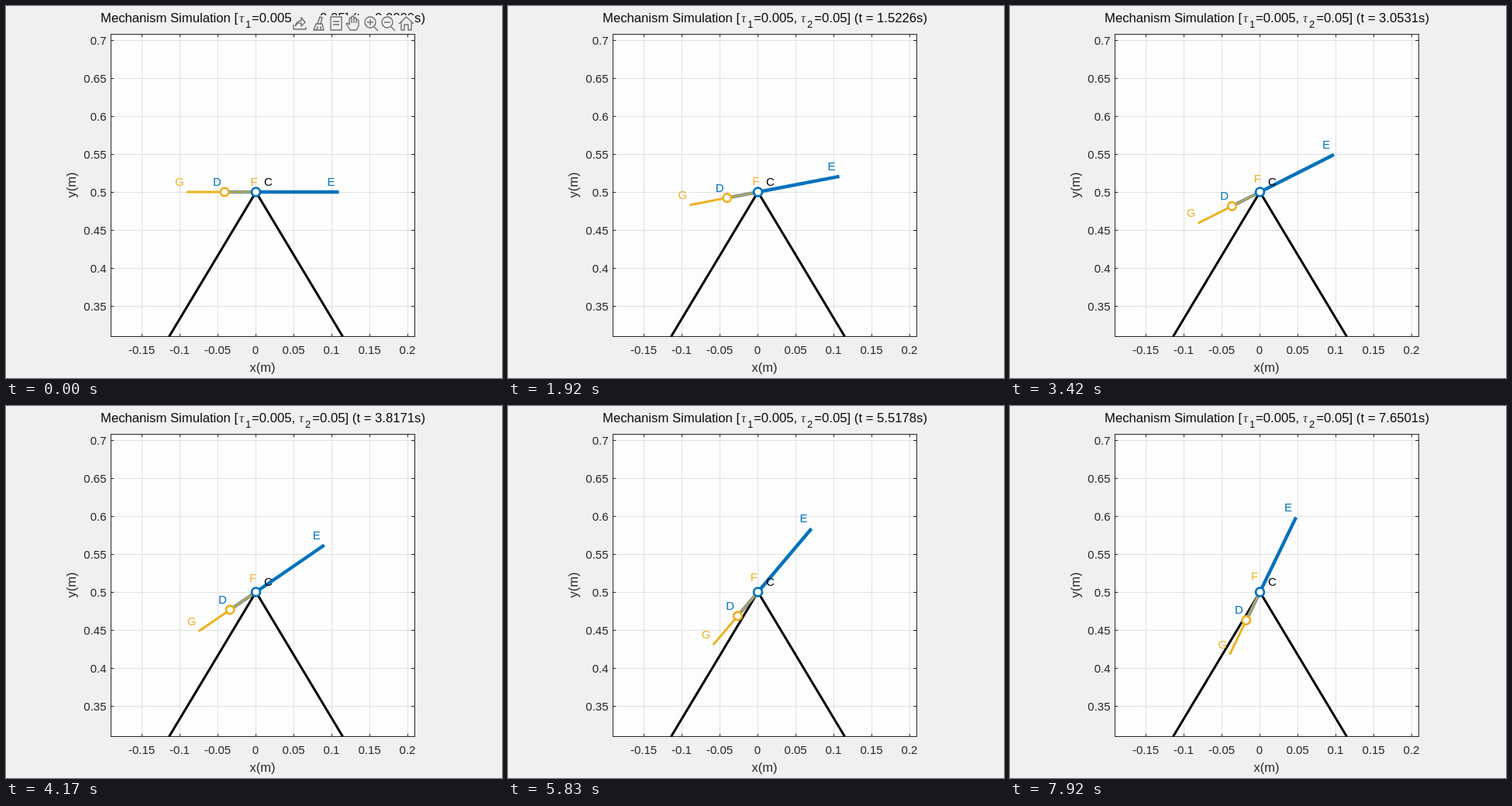
An HTML page that plays this animation: 640 px wide and 480 px high, repeating every 8000 ms.

```html
<!DOCTYPE html>
<html lang="en">
<head>
<meta charset="utf-8">
<title>Mechanism Simulation</title>
<style>
  html, body { margin: 0; width: 100%; height: 100%; overflow: hidden; background: #f0f0f0; }
  svg { display: block; width: 640px; height: 480px; font-family: "Liberation Sans", Arial, sans-serif; }
  text { fill: #262626; white-space: pre; }
  .title text { font-size: 16.7px; fill: #0a0a0a; }
  .title .tau { font: italic 17px "Liberation Serif", serif; fill: #333; }
  .title .sub { font-size: 13px; }
  .ticks { font-size: 15px; }
  .axis { font-size: 16.5px; text-anchor: middle; }
  .names { font-size: 15px; }
  .grid { stroke: #dfdfdf; }
  .frame { fill: none; stroke: #262626; }
  .icons { fill: none; stroke: #6e6e6e; stroke-width: 1.4; stroke-linejoin: round; }
</style>
</head>
<body>
<svg viewBox="0 0 640 480">
  <rect width="640" height="480" fill="#f0f0f0"/>
  <rect x="135" y="36" width="392" height="391" fill="#fdfdfe"/>
  <path id="grid" class="grid"/>
  <path id="marks" class="frame"/>
  <rect class="frame" x="135.5" y="36.5" width="392" height="390"/>
  <g id="ticks" class="ticks"></g>
  <text class="axis" x="331" y="471.5">x(m)</text>
  <text class="axis" transform="translate(90 231) rotate(-90)">y(m)</text>

  <g class="title">
    <text x="122" y="20.5">Mechanism Simulation [</text>
    <text class="tau" x="301" y="20.5">τ</text>
    <text class="sub" x="309" y="28">1</text>
    <text x="317" y="20.5">=0.005, </text>
    <text class="tau" x="378" y="20.5">τ</text>
    <text class="sub" x="386" y="28">2</text>
    <text id="clock" x="541" y="20.5" text-anchor="end"></text>
  </g>

  <g id="toolbar">
    <rect x="369" y="12" width="158" height="22" fill="#f0f0f0"/>
    <g class="icons">
      <path d="M371 24v6h16v-3M373 26q2-7 8-7v-4l5 6-5 5v-4q-5-1-8 4"/>
      <path d="M405 14l3 1-2 8h-4zM400 23h8l2 8h-13zM402 26l-1 5M406 26v5"/>
      <path d="M419 14h14v17h-14zM422 20h8M422 24h8"/>
      <path d="M444 31l-5-8q1-2 4 1v-8q2-2 3 0v-2q2-2 3 0v2q2-2 3 0v2q3-1 3 1v7l-3 5zM446 16v6M449 16v6M452 18v4"/>
      <path d="M475 27l5 5M466 21h8M470 17v8"/><circle cx="470" cy="21" r="7"/>
      <path d="M497 27l5 5M488 21h8"/><circle cx="492" cy="21" r="7"/>
      <path d="M507 23l9.5-9 9.5 9M510 21v10h4v-7h5v7h4v-10"/>
    </g>
  </g>

  <path d="M210.5 426.5L322.5 240 434.5 426.5" fill="none" stroke="#000" stroke-width="3"/>
  <g transform="translate(322.5 240)">
    <g id="bar">
      <path d="M-40.5 0H0" stroke="#5f8a98" stroke-width="4.2"/>
      <path d="M-40.5 0H0" stroke="#c0a756" stroke-width="2.2"/>
      <path d="M0 0H107" stroke="#0072bd" stroke-width="4.4"/>
      <path d="M-89.5 0H-40.5" stroke="#edb120" stroke-width="3"/>
      <circle cx="-40.5" r="5.2" fill="#fdfdfe" stroke="#edb120" stroke-width="2.8"/>
    </g>
    <circle r="5.4" fill="#fdfdfe" stroke="#0072bd" stroke-width="2.8"/>
    <g id="names" class="names"><text x="10.5" y="-8" style="fill:#000">C</text></g>
  </g>
</svg>
<script>
const SVG = 'http://www.w3.org/2000/svg';
const $ = id => document.getElementById(id);
const LOOP = 8000, FPS = 12;

function addText(parent, text, x, y, style = '') {
  const node = document.createElementNS(SVG, 'text');
  node.textContent = text;
  node.setAttribute('x', x);
  node.setAttribute('y', y);
  node.style.cssText = style;
  return parent.appendChild(node);
}

let grid = '', marks = '';
for (let i = -3; i <= 4; i++) {
  const x = Math.round(322 + i * 49.1) + 0.5;
  grid += `M${x} 37V426`;
  marks += `M${x} 427v-4M${x} 36v4`;
  addText($('ticks'), String(i * 5 / 100), x - 0.5, 449, 'text-anchor:middle');

  const y = Math.round(240 - i * 49.1) + 0.5;
  grid += `M136 ${y}H527`;
  marks += `M135 ${y}h4M527 ${y}h-4`;
  addText($('ticks'), String((50 + i * 5) / 100), 129.5, y + 5, 'text-anchor:end');
}
$('grid').setAttribute('d', grid);
$('marks').setAttribute('d', marks);

// Points along the rotating bar, measured from its pivot C.
const points = [['G', -89.5, '#edb120'], ['D', -40.5, '#0072bd'], ['F', 8, '#edb120'], ['E', 107, '#0072bd']]
  .map(([name, r, color]) => ({ r, node: addText($('names'), name, 0, 0, `fill:${color}`) }));

// step, simulated seconds, angle in degrees, degrees per second
const keys = [
  [0, 0, 0, 0],
  [23, 1.5226, 10.8, 10.6],
  [41, 3.0531, 26.8, 10.2],
  [58, 4.4963, 40.9, 9.3],
  [70, 5.5178, 49.8, 8.1],
  [83, 6.6248, 58.1, 6.7],
  [95, 7.6501, 64.2, 5.3]
];

function segment(step) {
  let i = 0;
  while (i < keys.length - 2 && step >= keys[i + 1][0]) i++;
  return [keys[i], keys[i + 1]];
}

// The solver starts with short time steps, then settles to even ones.
const warmUp = n => n - 5.1 * (1 - Math.exp(-n / 5.1));

function simTime(step, [a, b]) {
  if (step < 23) return b[1] * warmUp(step) / warmUp(23);
  return a[1] + (b[1] - a[1]) * (step - a[0]) / (b[0] - a[0]);
}

function angleAt(time, [a, b]) {
  const h = b[1] - a[1], u = (time - a[1]) / h, v = 1 - u;
  return v * v * (1 + 2 * u) * a[2] + u * u * (3 - 2 * u) * b[2]
    + h * u * v * (v * a[3] - u * b[3]);
}

function draw(ms) {
  const step = Math.min(95, Math.floor((ms + 4) * FPS / 1000));
  const span = segment(step);
  const time = simTime(step, span);
  const angle = angleAt(time, span);
  const rad = angle * Math.PI / 180;

  $('clock').textContent = `=0.05] (t = ${time.toFixed(4)}s)`;
  $('toolbar').style.display = step === 0 ? '' : 'none';
  $('bar').setAttribute('transform', `rotate(${-angle})`);
  for (const { r, node } of points) {
    node.setAttribute('x', r * Math.cos(rad) - 15);
    node.setAttribute('y', -r * Math.sin(rad) - 8);
  }
}

const start = performance.now();
function tick() {
  draw((performance.now() - start) % LOOP);
  requestAnimationFrame(tick);
}
draw(0);
requestAnimationFrame(tick);
</script>
</body>
</html>
```
